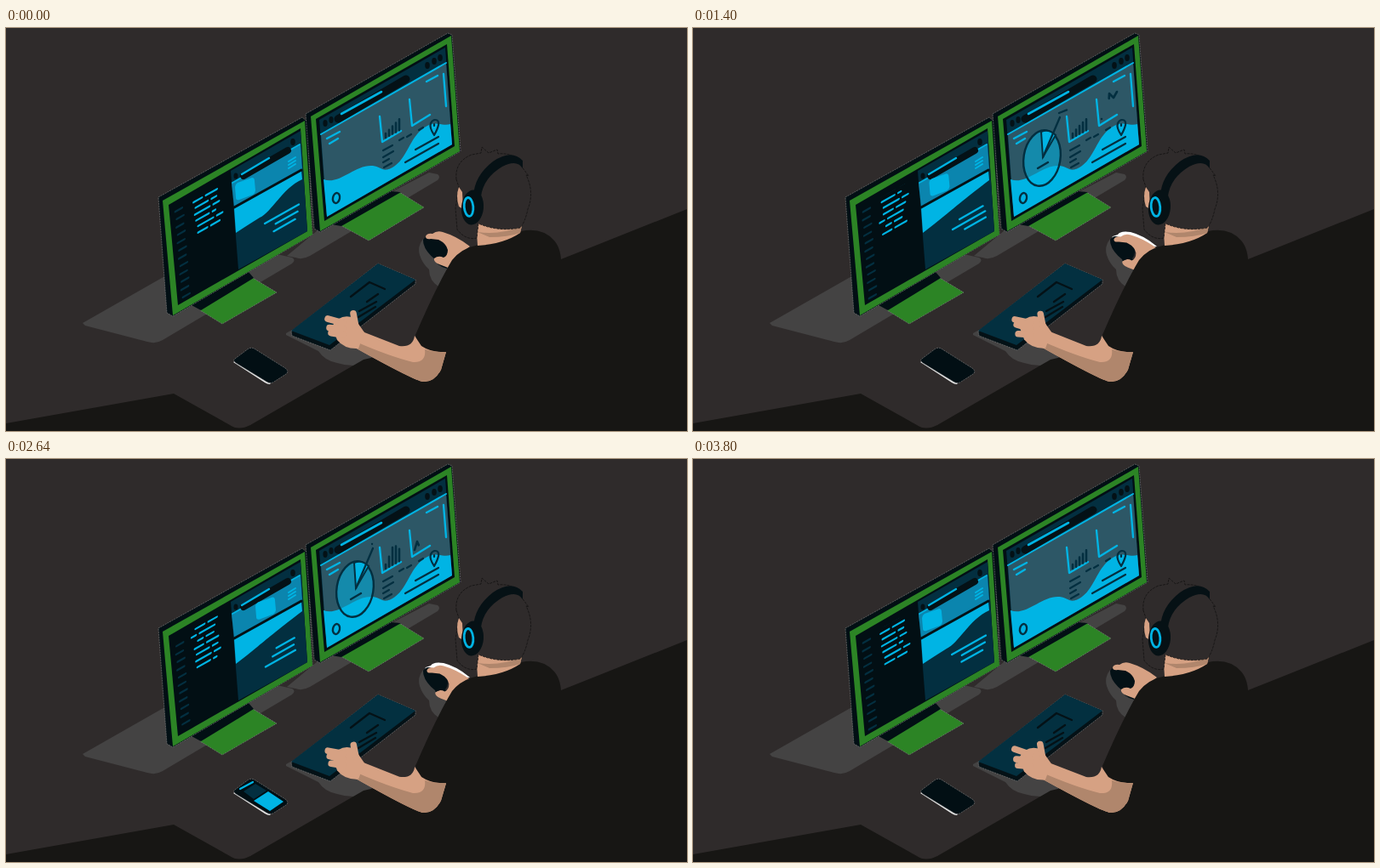
Animation, 800 px wide and 474 px high, one loop 3.84 s. Source, as an HTML page:

```html
<!DOCTYPE html>
<html lang="en">
<head>
<meta charset="utf-8">
<title>Developer at a desk</title>
<style>
html, body { margin: 0; width: 100%; height: 100%; overflow: hidden; background: #2f2b2b; }
svg { display: block; width: 800px; height: 474px; }
.ln { fill: none; stroke-linecap: round; stroke-linejoin: round; }
.cy { stroke: #00b4e4; }
.nv { stroke: #032f40; }
.dk { stroke: #041116; }
.rim { stroke: #858585; stroke-width: .6; stroke-dasharray: 2 1; }
</style>
</head>
<body>
<svg viewBox="0 0 800 474">
  <defs>
    <clipPath id="codeClip"><path d="M0 7H74V68H0Z"/></clipPath>
    <clipPath id="numClip"><path d="M0 9H22V115H0Z"/></clipPath>
  </defs>
  <rect width="800" height="474" fill="#2f2b2b"/>

  <!-- shadows on the desk -->
  <g fill="#444343">
    <path d="M90 347L190 290L318 266L336 270Q341 273 336 277L184 367Q176 372 166 369L93 350Z"/>
    <path d="M330 268L366 238L497 170L507 172Q511 175 507 179L357 268Q348 273 340 270Z"/>
    <path d="M329 359L345 350L425 376L431 392Q412 401 389 394Q374 391 367 380L329 361Z"/>
    <path d="M490 248Q483 257 486 267Q489 277 497 284Q497 297 508 304L522 280Z"/>
  </g>

  <!-- left monitor -->
  <path class="rim" d="M228 332L285 291L318 311L254 348Z" fill="#2c8425"/>
  <path d="M218 326L285 287L291 294L229 332Z" fill="#020f14"/>
  <path class="rim" d="M179 199L348 105L354 110L360 243L196 339L189 335Z" fill="#020f14"/>
  <path d="M184 203L351 109L360 243L196 338Z" fill="#2c8425"/>
  <path d="M191 208L346 118L354 239L202 326Z" fill="#020f14"/>
  <path d="M264 168L346 121L354 239L273 284Z" fill="#032f40"/>
  <path d="M265 183L346 137L348 166L268 210Z" fill="#0b85ae"/>
  <path class="ln cy" d="M266 182L345 137" stroke-width="2"/>
  <path class="ln dk" d="M279 174L331 144" stroke-width="8"/>
  <path class="ln cy" d="M277 172L309 153" stroke-width="2.4"/>
  <g fill="#041116"><ellipse cx="270" cy="174" rx="2.5" ry="3.5"/><ellipse cx="337" cy="134" rx="2.8" ry="4"/></g>
  <path class="ln cy" d="M332 157l8-5M332 161l8-5M332 165l8-5" stroke-width="2"/>
  <path id="card" d="M269 187Q269 184 272 182L289 176Q292 176 292 180L293 191Q293 194 290 196L274 202Q270 203 270 199Z" fill="#00b4e4"/>
  <path id="hill" fill="#00b4e4"/>
  <path class="ln dk" d="M268 211L347 167" stroke-width="3"/>
  <path id="notes" class="ln cy" stroke-width="2.3"/>
  <g transform="matrix(1 -.565 .078 1 191 209)">
    <g clip-path="url(#numClip)"><path id="nums" class="ln nv" stroke-width="2.4"/></g>
    <g clip-path="url(#codeClip)"><path id="code" class="ln cy" stroke-width="2.4"/></g>
  </g>

  <!-- right monitor -->
  <path class="rim" d="M393 232L462 193L491 211L426 250Z" fill="#2c8425"/>
  <path d="M382 231L451 192L464 193L394 233Z" fill="#020f14"/>
  <path class="rim" d="M352 101L519 6L524 8L534 145L369 240L362 236Z" fill="#020f14"/>
  <path d="M358 104L523 9L533 145L369 239Z" fill="#2c8425"/>
  <path d="M364 107L518 19L527 139L374 227Z" fill="#020f14"/>
  <path d="M368 108L516 23L524 137L377 222Z" fill="#032f40"/>
  <path d="M370 125L517 41L524 137L377 222Z" fill="#2d5766"/>
  <path d="M373 178C392 185 410 160 431 162C441 163 443 172 457 162C473 150 475 125 495 115C506 109 513 116 522 113L524 137L377 222Z" fill="#00b4e4"/>
  <path class="ln cy" d="M370 125L517 41" stroke-width="2"/>
  <path class="ln dk" d="M390 107L470 60" stroke-width="9"/>
  <path class="ln cy" d="M394 101L441 75" stroke-width="2.6"/>
  <g fill="#041116">
    <ellipse cx="375" cy="112" rx="2.6" ry="4"/><ellipse cx="382" cy="108" rx="2.6" ry="4"/>
    <ellipse cx="495" cy="44" rx="2.8" ry="4"/><ellipse cx="503" cy="39" rx="2.8" ry="4"/><ellipse cx="510" cy="35" rx="2.8" ry="4"/>
  </g>
  <path class="ln cy" d="M377 130l15-8M380 136l10-6M494 63l13-7M514 54l3 38M439 104l3 30l22-13M474 84l3 31l21-13" stroke-width="2.4"/>
  <path class="ln nv" d="M443 144l11-6M443 152l12-7M443 158l7-4M444 164l9-5M462 132l5-3M471 128l5-3M485 120l5-3M469 158l39-22M481 143l27-15" stroke-width="2.2"/>
  <path class="ln nv" d="M503 126Q497 117 499 112Q501 108 504 108Q509 108 508 114Q507 119 503 126ZM503 113v2" stroke-width="2.2"/>
  <ellipse class="ln nv" cx="388" cy="200" rx="4" ry="6" transform="rotate(12 388 200)" stroke-width="2.4"/>
  <path id="bars" class="ln nv" stroke-width="2.5"/>
  <path id="trend" class="ln nv" stroke-width="2.6" d="M480 107L483 97L486 104L488 96L489 77L494 82L498 75"/>
  <g id="pie" class="nv">
    <ellipse cx="410" cy="153" rx="21.5" ry="33" transform="rotate(9 410 153)" fill="#00b4e4" fill-opacity=".55" stroke-width="2.4"/>
    <path d="M411 152L409 122Q418 118 426 126Z" fill="#00b4e4" stroke-width="2"/>
    <path class="ln" d="M405 165L417 158" stroke-width="2.4"/>
  </g>
  <path id="pointer" class="ln nv" stroke-width="2.3"/>

  <!-- keyboard and phone -->
  <path class="rim" d="M335 357L437 277L481 296V301L381 379L336 362Z" fill="#041116"/>
  <path d="M335 356L437 277L481 296L380 373Z" fill="#033040"/>
  <path class="ln dk" d="M405 316L427 299L445 307M424 322l13-9M415 333l20-11M414 340l20-12" stroke-width="2.4"/>
  <path d="M267 393L270 391L314 414L310 419Q307 419 304 417Z" fill="#e8e8e8"/>
  <path class="rim" d="M269 389L285 377Q289 375 293 378L328 400Q333 404 329 407L315 416Q311 419 306 416L270 394Q266 391 269 389Z" fill="#020f14"/>
  <g id="phone">
    <path d="M279 391L293 382L306 390L291 400Z" fill="#032f40"/>
    <path d="M291 402L308 391L326 403L310 414Z" fill="#00b4e4"/>
    <path class="ln cy" d="M275 388L290 380" stroke-width="2.2"/>
  </g>

  <!-- mouse hand -->
  <path id="handGap" d="M545 257Q530 244 514 240Q502 238 499 243L493 245Q490 249 494 252L514 260Z" fill="#fff"/>
  <path d="M490 249Q494 243 500 246L516 247Q522 264 516 271Q521 276 518 283Q506 280 504 272Q490 261 490 249Z" fill="#041116"/>
  <path id="hand" d="M545 257Q530 245 513 240Q506 238 501 242Q495 241 493 245Q493 249 499 248L508 249Q517 253 519 261Q519 268 514 270Q508 267 503 271Q502 275 509 278L522 283Q530 266 545 257Z" fill="#d6a183"/>

  <!-- person -->
  <path d="M652 272L800 213V474H0V465L197 430L263 467Q273 474 287 467L420 390L485 375L481 361Q505 305 524 273Q535 259 555 255Q585 252 605 239Q630 234 644 250Q651 258 652 272Z" fill="#171614"/>
  <path d="M552 226L606 232L604 241Q585 254 554 256Z" fill="#d6a183"/>
  <path d="M554 240Q580 244 606 233L604 241Q590 246 568 246Z" fill="#b0866c"/>
  <path d="M529 178Q527 157 547 149L558 147L559 140L567 147L577 143L578 148Q598 146 605 162L614 174L611 173Q621 193 613 213Q610 228 604 235Q578 240 555 230L553 247Q540 250 530 237L528 212L532 187Z" fill="#2f2b2b" stroke="#141212" stroke-width=".8" stroke-dasharray="3 1.2"/>
  <path d="M532 187Q528 198 532 210L537 213L536 193Z" fill="#d6a183"/>
  <path id="bandGap" d="M590 149Q607 149 607 163L604 165Q604 154 590 153Z" fill="#fff"/>
  <g id="phones">
    <path d="M549 198Q550 174 572 157Q594 142 607 156L607 165Q600 154 583 163Q561 176 558 198Z" fill="#061115"/>
    <ellipse cx="548" cy="211" rx="13" ry="20.5" transform="rotate(5 548 211)" fill="#061115"/>
    <ellipse cx="543.5" cy="210.5" rx="5.3" ry="11" class="ln cy" stroke-width="2.8" transform="rotate(-5 543 210)"/>
  </g>

  <!-- typing arm -->
  <g id="arm">
    <path d="M416 356L462 374Q478 376 480 362L488 374Q500 382 517 381L511 402Q503 417 490 416Q480 415 410 376Z" fill="#d6a183"/>
    <path d="M411 369Q450 386 478 393Q494 394 492 378Q504 382 517 381L511 402Q503 417 490 416Q480 415 410 376Z" fill="#b0866c"/>
    <path d="M383 351Q392 335 409 341L421 358L414 377Q398 378 389 367Z" fill="#d6a183"/>
    <path id="fingers" class="ln" stroke="#d6a183" stroke-width="7.6"/>
  </g>
</svg>
<script>
const LOOP = 3840, STEP = 40, HALF = LOOP / 2, TAU = 2 * Math.PI, SLOPE = .565;
const $ = id => document.getElementById(id);
const set = (id, name, value) => $(id).setAttribute(name, value);
const show = (id, on) => set(id, 'visibility', on ? 'visible' : 'hidden');
const shift = (id, x, y) => set(id, 'transform', `translate(${x} ${y})`);
const times = (n, fn) => Array.from({ length: n }, (_, i) => fn(i)).join('');

const part = (t, from, to) => Math.min(1, Math.max(0, (t - from) / (to - from)));
const ease = (t, from, to) => { const p = part(t, from, to); return p * p * (3 - 2 * p); };
const pulse = (t, a, b, c, d) => ease(t, a, b) - ease(t, c, d);
const rand = n => { const s = Math.sin(n * 12.9898 + 4) * 43758.5453; return s - Math.floor(s); };

// One code row: a few dashes of random length, cut off at the caret.
function codeRow(row, y, caret) {
  const right = 52 + 14 * rand(row + 40);
  let d = '', x = 25 + 8 * rand(row);
  for (let k = 0; x < right - 3; k++) {
    const end = Math.min(x + 4 + 14 * rand(row * 5 + k), right, caret);
    if (end > x) d += `M${x} ${y}H${end}`;
    x = Math.max(end, x) + 4.5;
  }
  return d;
}

function drawCode(t) {
  const rows = 8, seen = 7, pos = t / LOOP * rows, top = Math.floor(pos), part = pos - top;
  set('code', 'd', times(seen, i => codeRow((top + i) % rows, 12 + (i - part) * 7.4,
    i === seen - 1 ? 25 + part * 60 : 70)));
  set('nums', 'd', times(13, i => `M${7 + i % 2} ${11 + (i - part) * 9.2}h8`));
}

function drawSite(t) {
  const x = 24 * pulse(t % HALF, 200, 700, 1100, 1600);
  shift('card', x, -x * SLOPE);
  const w = 1 - pulse(t % HALF, 200, 800, 1300, 1900);
  set('hill', 'd', `M268 212L347 168L348 ${179 - w}C${322 + w * 2} ${199 - w * 10} ` +
    `${308 + w * 4} ${210 + w * 7} ${296 + w * 2} ${220 + w * 3}Q${283 - w} ${231 + w * 2} 270 241Z`);

  const turn = t / HALF * TAU;
  set('notes', 'd', times(3, i => {
    const left = 312 - 8 * Math.cos(turn + i * 2.2), right = 341 + 3 * Math.cos(turn + i);
    const y = 221 + i * 7.5 - (left - 320) * SLOPE;
    return `M${left} ${y}l${right - left} ${(left - right) * SLOPE}`;
  }));
}

function drawTrend(t) {
  const len = $('trend').getTotalLength(), u = (t + HALF - 560) % HALF;
  const head = len * part(u, 0, 640), tail = len * part(u, 240, 1160);
  const on = head - tail > .5 && t > 560 && t < 3600;
  set('trend', 'stroke-dasharray', `0 ${tail} ${Math.max(head - tail, .01)} 200`);
  show('trend', on);
}

function drawCharts(t) {
  const grow = pulse(t, 1300, 2000, 2600, 3300);
  set('bars', 'd', times(5, i => {
    const h = 5 + i * 2 + grow * 12 * Math.sin(i * .7) ** 2;
    return `M${446 + i * 4} ${129 - i * 2.2}v${-h}`;
  }));

  const size = pulse(t, 80, 440, 3160, 3520);
  set('pie', 'transform', `translate(410 153) scale(${size}) translate(-410 -153)`);
  const reach = pulse(t, 400, 640, 2760, 3160), dash = 9 * pulse(t, 880, 1200, 2240, 2600);
  set('pointer', 'd', reach > .02
    ? `M411 152l${20 * reach} ${-47 * reach}M${412 + 18 * reach} ${147 - 47 * reach}l${dash + .1} ${-dash * .4}` : '');
}

function drawPerson(t) {
  const nod = t > 280 && t < 2680 ? (1 - Math.cos((t - 280) / 1200 * TAU)) / 2 : 0;
  shift('phones', -1.6 * nod, .8 * nod);
  show('bandGap', nod > .15);

  const slide = pulse(t, 560, 1240, 2720, 2960);
  shift('hand', slide * 1.4, slide * 3.4);
  show('handGap', slide > .05);

  const beat = t / 320 * TAU, tap = k => 1.8 * Math.sin(beat + k * 2);
  set('arm', 'transform', `rotate(${.3 * Math.sin(beat)} 492 392)`);
  set('fingers', 'd', times(3, i => `M${378 + i * 2} ${342 + i * 9 + tap(i)}L396 ${347 + i * 7}`) +
    `M408 ${336 + tap(3) / 2}L411 352`);
}

function frame() {
  const t = Math.floor(performance.now() % LOOP / STEP) * STEP;
  drawCode(t);
  drawSite(t);
  drawTrend(t);
  drawCharts(t);
  drawPerson(t);
  set('phone', 'opacity', pulse(t, 1600, 1760, 3200, 3360));
  requestAnimationFrame(frame);
}
frame();
</script>
</body>
</html>
```
